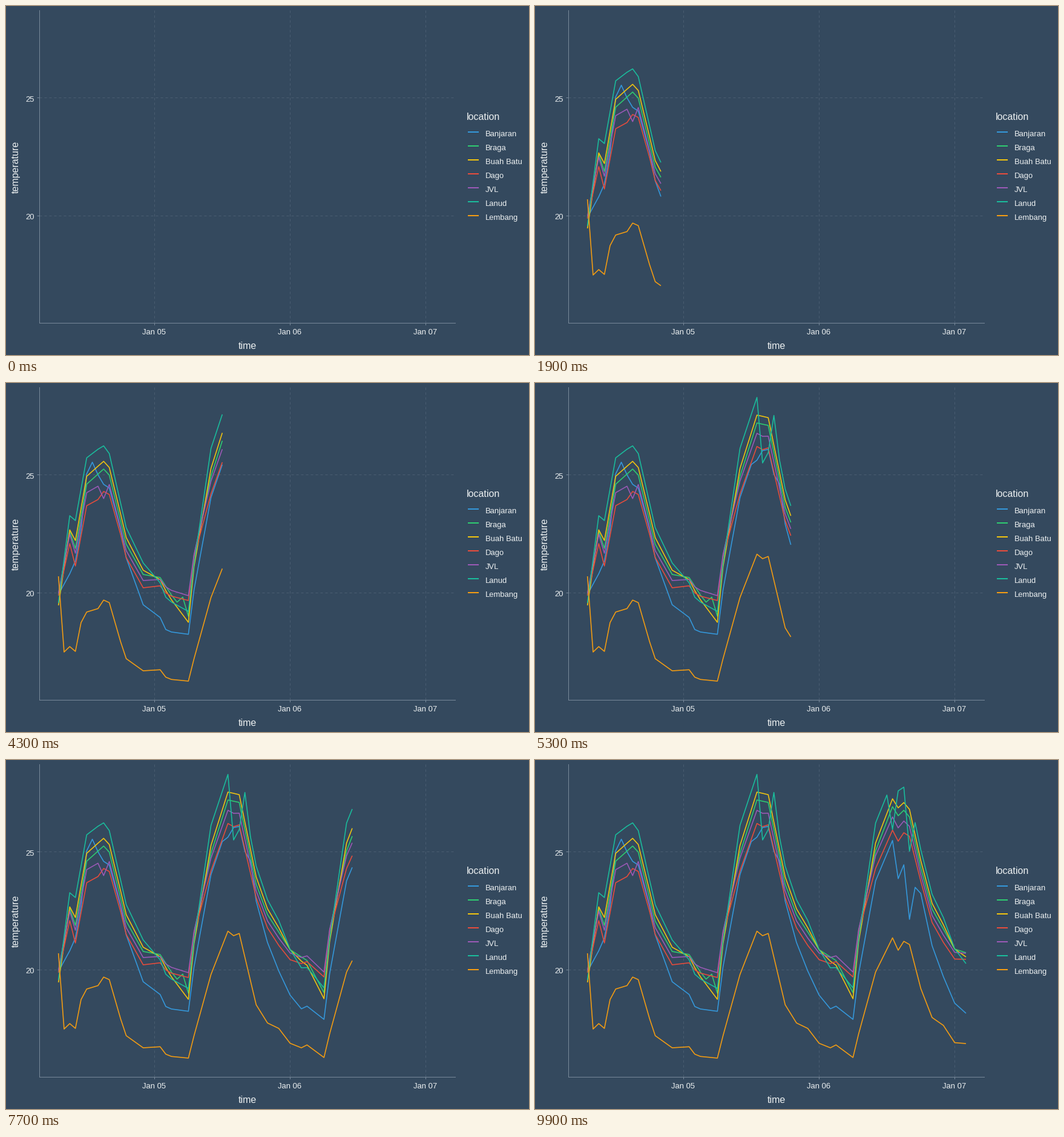
A matplotlib script that plays this animation: 864x576 px, repeating every 10000 ms.

```python
import matplotlib.pyplot as plt
import numpy as np
from matplotlib.animation import FuncAnimation

W, H, FRAMES = 864, 576, 100
BG, INK, AXIS, GRID = "#34495e", "#ecf0f1", "#778899", "#4a5d71"
LEFT, RIGHT, TOP, BOTTOM = 55.5, 743, 7, 523.5
DAY, MIDNIGHT = 224, 245.3
HOURS = np.arange(68)            # the record starts at 07:00
X = MIDNIGHT + (HOURS - 17) * DAY / 24

# Turning points of the shared curve: hour, height on the stage
BASE = [(0, 349), (2, 245), (3, 273), (5, 167), (8, 142), (9, 152),
        (12, 266), (15, 316), (18, 321), (20, 350), (23, 385), (24, 285),
        (27, 154), (30, 66), (32, 70), (35, 205), (37, 255), (41, 313),
        (44, 331), (47, 384), (48, 282), (51, 150), (54, 77), (55, 92),
        (56, 83), (57, 94), (59, 178), (61, 246), (65, 312), (67, 318)]

# Clock hours at which a location's daily offset from that curve is given
CLOCK = [2, 6, 7, 10, 14, 18, 22]

plt.rcParams["font.family"] = "Liberation Sans"
fig = plt.figure(figsize=(W / 72, H / 72), dpi=72, facecolor=BG)
ax = fig.add_axes([0, 0, 1, 1])
ax.set(xlim=(0, W), ylim=(H, 0))
ax.axis("off")


def stroke(xs, ys, color, width=1, **kw):
    return ax.plot(xs, ys, color=color, lw=width, snap=False,
                   solid_capstyle="butt", dash_capstyle="butt",
                   solid_joinstyle="round", **kw)[0]


def label(x, y, s, size=13, ha="left", rotation=0):
    ax.text(x, y, s, size=size, ha=ha, va="baseline", color=INK,
            rotation=rotation, rotation_mode="anchor")


# Grid, axes and titles
dash = (0, (4, 4))
for temp, y in ((25, 151.5), (20, 346.5)):
    stroke([LEFT, RIGHT], [y, y], GRID, ls=dash)
    stroke([LEFT - 4, LEFT], [y, y], AXIS)
    label(47, y + 6, str(temp), ha="right")
for i in range(3):
    x = 245.5 + DAY * i
    stroke([x, x], [BOTTOM, TOP], GRID, ls=dash)
    stroke([x, x], [BOTTOM, BOTTOM + 3.5], AXIS)
    label(x - 1, 542, f"Jan 0{5 + i}", ha="center")
stroke([LEFT, LEFT], [TOP, BOTTOM], AXIS)
stroke([LEFT - 0.5, RIGHT], [BOTTOM, BOTTOM], AXIS)
label(399, 566, "time", 16, "center")
label(21, 265.5, "temperature", 16, "center", 90)
label(761, 188, "location", 16)

shared = np.interp(HOURS, *zip(*BASE))
traces = []


def trace(name, color, offsets, spikes=None, drift=0):
    """Add a legend row and a line: shared curve + daily offset + spikes."""
    row = 23 * len(traces)
    stroke([763, 781], [208 + row] * 2, color, 2)
    label(792, 215 + row, name)
    ys = shared + np.interp(HOURS + 7, CLOCK, offsets, period=24)
    ys += drift * (HOURS / HOURS[-1] - 0.5)
    for hour, size in (spikes or {}).items():
        ys[hour] += size
    traces.append((stroke([], [], color, 1.6), ys))


trace("Banjaran", "#3498db", [80, 36, 62, 39, 45, 27, 61],
      {0: -42, 2: 42, 5: -42, 6: -55, 7: -28, 30: 20, 34: -25,
       55: 46, 56: 36, 57: 119, 58: 28}, drift=40)
trace("Braga", "#2ecc71", [0] * 7, {22: -20})
trace("Buah Batu", "#f1c40f", [7, 10, 18, -13, -13, -12, -7])
trace("Dago", "#e74c3c", [11, -26, 2, 29, 42, 22, 22])
trace("JVL", "#9b59b6", [1, -34, -2, 8, 20, 11, 10], {8: 31})
trace("Lanud", "#1abc9c", [18, -8, 14, -46, -41, -30, -19],
      {31: 105, 32: 83, 33: -26, 54: 80, 57: 92})
trace("Lembang", "#f39c12", [150, 107, 170, 200, 222, 199, 159],
      {0: -200, 1: -33, 3: -30, 4: -30})

# Each hour lands on a whole frame; frames between hours are interpolated
arrival = np.round(HOURS * (FRAMES - 1) / HOURS[-1])


def draw(frame):
    now = np.interp(frame, arrival, HOURS)
    t = np.append(HOURS[HOURS < now], now) if frame else []
    for line, ys in traces:
        line.set_data(np.interp(t, HOURS, X), np.interp(t, HOURS, ys))
    return [line for line, _ in traces]


anim = FuncAnimation(fig, draw, frames=FRAMES, init_func=lambda: draw(0),
                     interval=100, repeat=True, repeat_delay=0)
plt.show()
```
